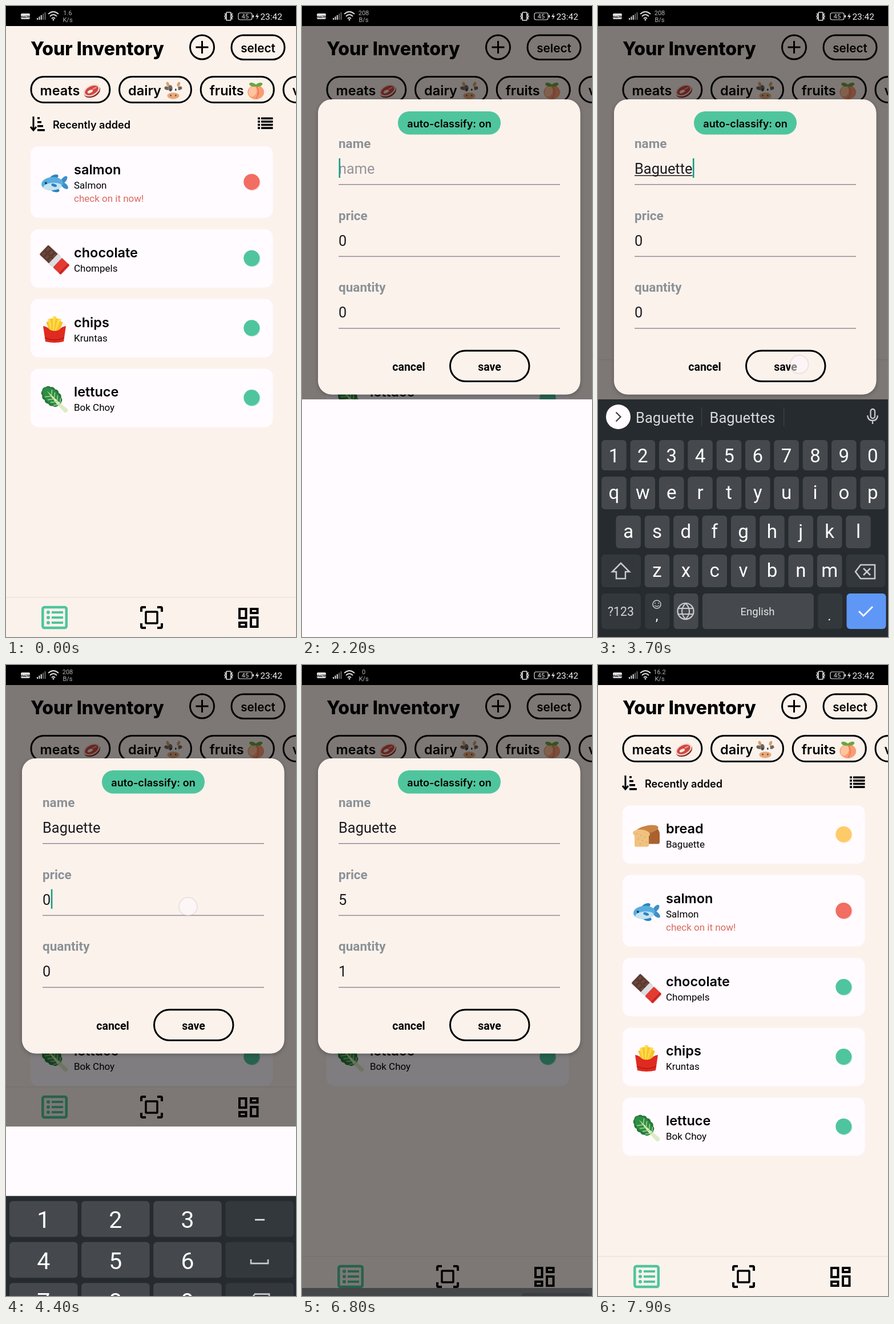
Write an HTML page with a canvas that moves like this. It is 508 px wide and 1102 px high and loops after 8 s.

```html
<!DOCTYPE html>
<html lang="en">
<head>
<meta charset="utf-8">
<title>Inventory</title>
<style>
html, body { margin: 0; width: 508px; height: 1102px; overflow: hidden; background: #fbf2ec; }
canvas { display: block; }
</style>
</head>
<body>
<canvas id="stage" width="508" height="1102"></canvas>
<script>
const ctx = document.getElementById('stage').getContext('2d');
const W = 508, H = 1102, LOOP = 8000, STEP = 100;
const CREAM = '#fbf2ec', CARD = '#fffbff', GREEN = '#4fc59d', RED = '#f26d62', YELLOW = '#ffca68';
const KEY = '#45494d', DARK_KEY = '#33383d', BLUE = '#5f97f6', ICON = '#c9cacc';
const inter = (size, weight = 600) => `${weight} ${size}px Inter, sans-serif`;
const roboto = (size, weight = 400) => `${weight} ${size}px Roboto, sans-serif`;
const clamp = v => Math.max(0, Math.min(1, v));

function text(s, x, y, font, color = '#000', align = 'left') {
  ctx.font = font;
  ctx.fillStyle = color;
  ctx.textAlign = align;
  ctx.fillText(s, x, y);
  return ctx.measureText(s).width;
}
function rect(x, y, w, h, color) {
  ctx.fillStyle = color;
  ctx.fillRect(x, y, w, h);
}
function box(x, y, w, h, r, fill, stroke, width = 3) {
  ctx.beginPath();
  ctx.roundRect(x, y, w, h, r);
  if (fill) { ctx.fillStyle = fill; ctx.fill(); }
  if (stroke) { ctx.strokeStyle = stroke; ctx.lineWidth = width; ctx.stroke(); }
}
function circle(x, y, r, fill, stroke, width) {
  box(x - r, y - r, 2 * r, 2 * r, r, fill, stroke, width);
}
function oval(x, y, rx, ry, color, angle = 0) {
  ctx.beginPath();
  ctx.ellipse(x, y, rx, ry, angle, 0, 2 * Math.PI);
  ctx.fillStyle = color;
  ctx.fill();
}
// Path around (x, y); filled unless a line width is given.
function path(d, x, y, color, width = 0) {
  const p = new Path2D();
  p.addPath(new Path2D(d), new DOMMatrix([1, 0, 0, 1, x, y]));
  ctx.lineWidth = width;
  ctx.fillStyle = ctx.strokeStyle = color;
  if (width) ctx.stroke(p); else ctx.fill(p);
}

// Each picture is drawn around the origin, about 48 units wide.
const pictures = {
  fish() {
    ctx.rotate(-0.08);
    for (const side of [-1, 1]) {
      oval(17, side * 5, 8, 4, '#3c8fc8', side * 0.8);
      oval(0, side * 11, 8, 4, '#2f82bd', side * 0.3);
    }
    oval(-4, 0, 19, 11.5, '#58ade0');
    oval(-4, 5, 16, 6.5, '#c4e4f3');
    oval(-1, 3, 5, 2.5, '#2f82bd', 0.4);
    circle(-15, -2, 2, '#173b55');
  },
  chocolate() {
    ctx.rotate(0.76);
    box(-26, -11.5, 30, 23, 2, '#6c473b');
    for (let i = 0; i < 6; i++)
      box(-24 + i % 3 * 8, i < 3 ? -9.5 : 1, 6.5, 8.5, 1, null, '#4d3028', 1);
    rect(-3, -11.5, 13, 23, '#dcdde2');
    box(7, -11.5, 19, 23, 2, '#e33a32');
    rect(22, -11.5, 2, 23, '#b7201f');
  },
  fries() {
    for (let i = -3; i <= 3; i++) {
      ctx.save();
      ctx.rotate(i * 0.13);
      box(i * 2 - 3, -23 + Math.abs(i) * 1.2 + (i & 1) * 2, 6, 30, 1, i & 1 ? '#f8c42a' : '#ffdc4d');
      ctx.restore();
    }
    path('M-20-6Q-12-5-9 0 0 5 9 0 12-5 20-6L16 21Q0 25-16 21Z', 0, 0, '#df2a20');
    path('M-17 14Q0 22 17 14', 0, 0, '#b51a14', 2);
  },
  lettuce() {
    ctx.rotate(0.78);
    for (let i = 0; i < 12; i++) {
      const a = i * Math.PI / 6;
      circle(-7 + 15 * Math.cos(a), 9 * Math.sin(a), 6, '#24783d');
    }
    oval(-8, 0, 18, 11, '#2f8d45');
    path('M-20-1L8-2 29-4Q33 0 29 4L8 3Z', 0, 0, '#dcecc4');
    for (let x = -14; x < 8; x += 7) path('M6 0L-1-9M6 0L-1 9', x, 0, '#a9d88b', 1.5);
  },
  bread() {
    box(-10, -17, 33, 31, [14, 14, 3, 10], '#a9612f');
    oval(1, -11, 20, 7, '#c98445', -0.2);
    box(-21, -4, 25, 23, 3, '#f0c27f');
    oval(-9, -4, 15, 7, '#f0c27f', 0.1);
    for (let i = 0; i < 7; i++) circle(-17 + i * 7 % 18, -4 + i * 3, 1, '#d9a05a');
  },
  steak() {
    ctx.rotate(-0.45);
    oval(0, 2, 24, 16, '#8f2d27');
    oval(0, -1, 24, 15, '#f5d8cd');
    oval(0, -1, 20, 11.5, '#cf4842');
    oval(-5, 0, 8, 4, '#f7e7da');
    oval(10, -3, 7, 2, '#ee948b');
  },
  cow() {
    for (const side of [-1, 1]) {
      oval(side * 15, -18, 4, 7, '#d7a067', side * 0.4);
      oval(side * 18, -7, 7, 5, '#70665f', side * -0.3);
    }
    box(-14, -17, 28, 36, 11, '#f7f4f1');
    oval(-8, -7, 6, 9, '#716862');
    oval(0, 14, 17, 9, '#e8aa7b');
    for (const side of [-1, 1]) {
      oval(side * 7, -3, 2, 3, '#3b2b28');
      oval(side * 7, 13, 2, 2.5, '#7b4a35');
    }
  },
  peach() {
    oval(0, 4, 23, 20, '#fa9c72');
    oval(-9, 2, 11, 15, '#ffc49d', 0.3);
    path('M1-14Q13 4 1 22', 0, 0, '#e26957', 1.8);
    for (const side of [-1, 1]) oval(side * 9, -17, 10, 5, '#68a83d', side * -0.3);
  }
};
function picture(name, x, y, size) {
  ctx.save();
  ctx.translate(x, y);
  ctx.scale(size / 48, size / 48);
  pictures[name]();
  ctx.restore();
}

const foods = {
  bread: ['Baguette', YELLOW],
  salmon: ['Salmon', RED, 'fish'],
  chocolate: ['Chompels', GREEN],
  chips: ['Kruntas', GREEN, 'fries'],
  lettuce: ['Bok Choy', GREEN]
};

function statusBar(t) {
  rect(0, 0, W, 35, '#000');
  const c = '#dedede';
  box(26, 13, 16, 10, 2, c);
  text('VoLTE', 34, 20.5, roboto(6, 700), '#000', 'center');
  for (let i = 0; i < 5; i++)
    rect(54 + i * 3.4, 21 - i * 2.5, 2, 3 + i * 2.5, i < 3 ? c : '#666');
  path('M-9-4Q0-12 9-4M-6 0Q0-6 6 0M-3 4Q0 1 3 4', 83, 18, c, 2);
  circle(83, 24, 1.5, c);
  const rate = t < 1700 ? '1.6 K/s' : t < 5100 ? '208 B/s' : t < 7800 ? '0 K/s' : '16.2 K/s';
  rate.split(' ').forEach((part, i) => text(part, 108, 16 + i * 12, roboto(11), '#b5b5b5', 'center'));
  box(386, 11, 8, 14, 1, null, c, 1.7);
  path('M-7-5l2 2-2 3 2 3-2 2M7-5l-2 2 2 3-2 3 2 2', 390, 18, c, 1.5);
  box(407, 12, 24, 12, 3, null, c, 1.2);
  rect(432, 16, 2, 4, c);
  text('45', 419, 22, roboto(11), c, 'center');
  path('M1-6L-3 1H0L-1 6 3-1H0Z', 440, 18, c);
  text('23:42', 484, 23.5, roboto(15.5), '#eee', 'right');
}

function header(plusAlpha) {
  text('Your Inventory', 43, 86, inter(32, 800));
  ctx.globalAlpha = plusAlpha;
  circle(343.5, 72, 21, null, '#000');
  path('M-11 0H11M0-11V11', 343.5, 72, '#000', 3);
  ctx.globalAlpha = 1;
  box(395, 51, 93, 42.5, 21, null, '#000');
  text('select', 441.5, 80.5, inter(20.7), '#000', 'center');
  let x = 43;
  for (const [label, image] of [['meats', 'steak'], ['dairy', 'cow'], ['fruits', 'peach'], ['veggies', 'lettuce']]) {
    const w = text(label, x + 16.5, 155.5, inter(23.5)) + 70;
    box(x + 1, 123.5, w - 2, 45, 22, null, '#000');
    picture(image, x + w - 32.5, 148, 30);
    x += w + 14.8;
  }
  path('M5 0V22M0 18L5 24 10 18', 43, 193, '#000', 3);
  for (let i = 0; i < 4; i++) {
    rect(55, 194 + i * 7, 4 + i * 3, 3.5, '#000');
    rect(441, 194.5 + i * 5.6, 4, 3.6, '#000');
    rect(447, 194.5 + i * 5.6, 20.5, 3.6, '#000');
  }
  text('Recently added', 82, 213.5, inter(18.1));
}

function list(withBread) {
  let y = 245;
  for (const [name, [kind, color, image]] of Object.entries(foods)) {
    if (name === 'bread' && !withBread) continue;
    const urgent = color === RED, h = urgent ? 125 : 102, mid = y + h / 2;
    box(43, y, 424.5, h, 14, CARD);
    picture(image || name, 85, mid + 2.5, 48);
    text(name, 119, y + 49, inter(23.5));
    text(kind, 119, y + 74, roboto(17));
    if (urgent) text('check on it now!', 119, y + 97, roboto(17), '#d9695f');
    ctx.globalAlpha = 0.3;
    circle(431.5, mid + 1, 14, color);
    ctx.globalAlpha = 1;
    circle(430.3, mid - 0.3, 14, color);
    y += h + 19.8;
  }
}

function tabBar(bottom) {
  const y = bottom - 34;
  rect(0, bottom - 70, W, 70, CREAM);
  rect(0, bottom - 70, W, 1.5, '#eee4df');
  box(64.3, y - 18, 41.5, 36, 3, null, GREEN, 4.5);
  for (let i = -1; i < 2; i++) {
    circle(74, y + i * 9, 3, GREEN);
    rect(80, y + i * 9 - 2, 20, 4, GREEN);
  }
  path('M-18-10V-16Q-18-18-16-18H-10M10-18H16Q18-18 18-16V-10M18 10V16Q18 18 16 18H10M-10 18H-16Q-18 18-18 16V10', 255, y, '#000', 4);
  box(245, y - 10, 20, 20, 1, null, '#000', 3.5);
  for (const side of [-1, 1]) {
    const x = 419 + side * 10;
    box(x, side < 0 ? y - 15 : y, 11.5, 16, 0, null, '#000', 4);
    box(x, side < 0 ? y + 9 : y - 15, 11.5, 7, 0, null, '#000', 4);
  }
}

const modalShape = () => ctx.roundRect(28, 163, 459.5, 515.5, 24);

// Darkens the page around the dialog and adds its soft shadow.
function backdrop(alpha, bottom) {
  ctx.save();
  ctx.beginPath();
  ctx.rect(0, 35, W, bottom - 35);
  modalShape();
  ctx.clip('evenodd');
  rect(0, 35, W, H, `rgba(0,0,0,${alpha / 2})`);
  ctx.shadowColor = `rgba(0,0,0,${alpha * alpha * 0.25})`;
  ctx.shadowBlur = 7;
  ctx.shadowOffsetY = 2;
  ctx.beginPath();
  modalShape();
  ctx.fillStyle = '#000';
  ctx.fill();
  ctx.restore();
}

function modal(alpha, state) {
  ctx.save();
  ctx.globalAlpha = alpha;
  ctx.beginPath();
  modalShape();
  ctx.fillStyle = CREAM;
  ctx.fill();
  box(168, 184, 180, 40.5, 20, GREEN);
  text('auto-classify: on', 258, 211.5, inter(18.1), '#000', 'center');
  ['name', 'price', 'quantity'].forEach((label, i) => {
    const y = 241 + i * 125.6, value = state[label], empty = i === 0 && !value;
    text(label, 64, y + 7, roboto(22.5, 700), '#8b9297');
    const shown = text(empty ? 'name' : value, 64, y + 52, roboto(25.4), empty ? '#97949a' : '#1d1b20');
    const width = empty ? 0 : shown;
    if (state.composing && i === 0) rect(64, y + 54.5, width, 1.5, '#1d1b20');
    rect(64, y + 70, 388, 1.5, '#938c96');
    if (state.focus === label) rect(64.5 + width, y + 25, 2.6, 34, '#199b85');
  });
  text('cancel', 187, 636.5, roboto(19.5, 700), '#000', 'center');
  box(259.5, 602, 138.5, 53.5, 27, null, '#000');
  text('save', 328.5, 636.5, roboto(19.5, 700), '#000', 'center');
  ctx.restore();
}

const LETTERS_H = 415, NUMBERS_H = 296, PITCH = 50.35;
const letterRows = ['1234567890', 'qwertyuiop', 'asdfghjkl', 'zxcvbnm'];
const numberRows = ['123-', '456_', '789<', ',0.>'];

// Key boxes relative to the top of their keyboard.
function letterKey(r, i) {
  const indent = Math.max(0, r - 1.5), h = r ? 57 : 53;
  const shift = r < 2 ? 0 : indent;
  return { x: 6.2 + (i + shift) * PITCH, y: 124 + r * 68 - h, w: 43.6, h };
}
function numberKey(r, i) {
  return { x: 6 + i * 126.1, y: 9 + r * 71.5, w: 119.5, h: 62.5 };
}
function keyCenter(ch, keyRows, keyAt, height) {
  const r = keyRows.findIndex(row => row.includes(ch));
  const k = keyAt(r, keyRows[r].indexOf(ch));
  return [k.x + k.w / 2, H - height + k.y + k.h / 2];
}
const letterTap = ch => keyCenter(ch, letterRows, letterKey, LETTERS_H);
const numberTap = ch => keyCenter(ch, numberRows, numberKey, NUMBERS_H);

const backspace = (x, y) => path('M-17 0L-8-12H17V12H-8ZM-3-6L9 6M9-6L-3 6', x, y, ICON, 2.6);
const check = (x, y) => path('M-12 0L-4 8 12-8', x, y, '#fff', 2.8);

function letterKeyboard(top, typed) {
  rect(0, top, W, LETTERS_H, '#262b2f');
  circle(35.5, top + 30.5, 21.5, CARD);
  path('M-4-8L4 0-4 8', 35.5, top + 30.5, '#444', 2.4);
  if (typed) {
    text(typed, 117, top + 40.5, roboto(25.5), '#d8d9db', 'center');
    text(typed + 's', 253, top + 40.5, roboto(25.5), '#d8d9db', 'center');
  }
  for (const x of [181, 325]) rect(x, top + 14, 1.2, 33, '#3f4448');
  box(477.5, top + 17, 7.5, 16, 4, null, ICON, 2.3);
  path('M-9 0Q-8 9 0 9 8 9 9 0M0 9V15', 481, top + 28, ICON, 2.3);
  letterRows.forEach((row, r) => [...row].forEach((ch, i) => {
    const k = letterKey(r, i);
    box(k.x, top + k.y, k.w, k.h, 6, KEY);
    text(typed ? ch : ch.toUpperCase(), k.x + k.w / 2, top + k.y + 38.5, roboto(33), '#fff', 'center');
  }));
  const shiftY = top + 271, y = top + 339;
  for (const x of [6, 434.5]) box(x, shiftY, 69, 57, 6, DARK_KEY);
  path('M0-14L15 1H8V13H-8V1H-15Z', 40, shiftY + 29, ICON, 2.5);
  backspace(468, shiftY + 30);
  let x = 6;
  for (const [w, color] of [[69, DARK_KEY], [43, DARK_KEY], [43, KEY], [195, KEY], [43, DARK_KEY], [69, BLUE]]) {
    box(x, y, w, 62, 6, color);
    x += w + 7.3;
  }
  text('?123', 40, y + 39, roboto(21.3), '#d5d6d8', 'center');
  circle(103, y + 19, 7, null, ICON, 1.6);
  path('M-3-3v2M3-3v2M-4 2Q0 5 4 2', 103, y + 19, ICON, 1.5);
  circle(153.5, y + 31, 14, null, ICON, 2.2);
  path('M-14-5H14M-14 5H14M0-14Q-13 0 0 14Q13 0 0-14', 153.5, y + 31, ICON, 2);
  text('English', 279.5, y + 38, roboto(18.5), '#e4e5e6', 'center');
  text(',', 103, y + 47, roboto(24), '#fff', 'center');
  text('.', 405.5, y + 47, roboto(24), '#fff', 'center');
  check(469, y + 31);
}

function numberKeyboard(top) {
  rect(0, top, W, NUMBERS_H, '#262b2f');
  numberRows.forEach((row, r) => [...row].forEach((ch, i) => {
    const k = numberKey(r, i), y = top + k.y, cx = k.x + k.w / 2, cy = y + k.h / 2;
    box(k.x, y, k.w, k.h, 6, ch === '>' ? BLUE : '-_<,.'.includes(ch) ? DARK_KEY : KEY);
    if (ch === '-') rect(cx - 8, cy, 17, 2.6, '#e6e6e7');
    else if (ch === '_') path('M-15-2V5H15V-2', cx, cy + 1, ICON, 2.6);
    else if (ch === '<') backspace(cx, cy);
    else if (ch === '>') check(cx, cy);
    else text(ch, cx, y + 47, roboto(41), '#fff', 'center');
  }));
}

// A keyboard slides up from `open`, and fades while sliding down from `close`.
function withKeyboard(t, open, close, height, render) {
  if (t < open || t >= close + 400) return;
  const enter = Math.pow(1 - clamp((t - open) / 400), 3.1);
  const leave = 1 - Math.pow(1 - clamp((t - close) / 400), 2.2);
  ctx.globalAlpha = 1 - leave * 0.4;
  render(H - height + height * Math.max(enter, leave));
  ctx.globalAlpha = 1;
}

const WORD = 'Baguette', TYPING = 2600, TAP = 250;
const save = [340, 628];
const taps = [
  [800, [341.5, 78]], [3500, [352.5, 626]], [4200, [319, 422]],
  [5000, numberTap('<'), 100], [5200, numberTap('5')], [5600, [326.5, 537]],
  [6000, numberTap('<'), 100], [6200, numberTap('1'), 100], [6400, save], [6900, save],
  ...[...WORD.toLowerCase()].map((ch, i) => [TYPING + i * STEP, letterTap(ch), STEP])
];

function focusAt(t) {
  if (t < 1700 || t >= 6500 || (t >= 3800 && t < 4300)) return '';
  return t < 3800 ? 'name' : t < 5700 ? 'price' : 'quantity';
}

function draw(t) {
  const typed = WORD.slice(0, Math.max(0, (t - TYPING) / STEP + 1));
  const inset = t >= 1900 && t < 3800 ? LETTERS_H : t >= 4300 && t < 6500 ? NUMBERS_H : 0;
  const bottom = H - inset;
  const shown = clamp((t - 1050) / 450) * (1 - clamp((t - 7100) / 450));

  rect(0, 0, W, H, CARD);
  ctx.save();
  ctx.beginPath();
  ctx.rect(0, 0, W, bottom);
  ctx.clip();
  rect(0, 0, W, bottom, CREAM);
  header(t < 1000 ? 1 : Math.min(1, 0.2 + Math.max(0, t - 1100) / 500));
  list(t >= 7800);
  tabBar(t < 2300 ? H : bottom);
  if (shown) {
    backdrop(shown, bottom);
    modal(shown, {
      name: typed,
      price: t < 5000 ? '0' : t < 5200 ? '' : '5',
      quantity: t < 6000 ? '0' : t < 6200 ? '' : '1',
      composing: t < 3800,
      focus: focusAt(t)
    });
  }
  ctx.restore();

  withKeyboard(t, 2200, 3700, LETTERS_H, top => letterKeyboard(top, typed));
  withKeyboard(t, 4300, 6500, NUMBERS_H, numberKeyboard);
  statusBar(t);
  for (const [start, [x, y], length = TAP] of taps)
    if (t >= start && t < start + length) circle(x, y, 16, 'rgba(255,250,255,.5)', 'rgba(130,110,130,.13)', 2);
}

function frame(now) {
  draw(Math.floor(now % LOOP / STEP) * STEP);
  requestAnimationFrame(frame);
}
requestAnimationFrame(frame);
</script>
</body>
</html>
```
